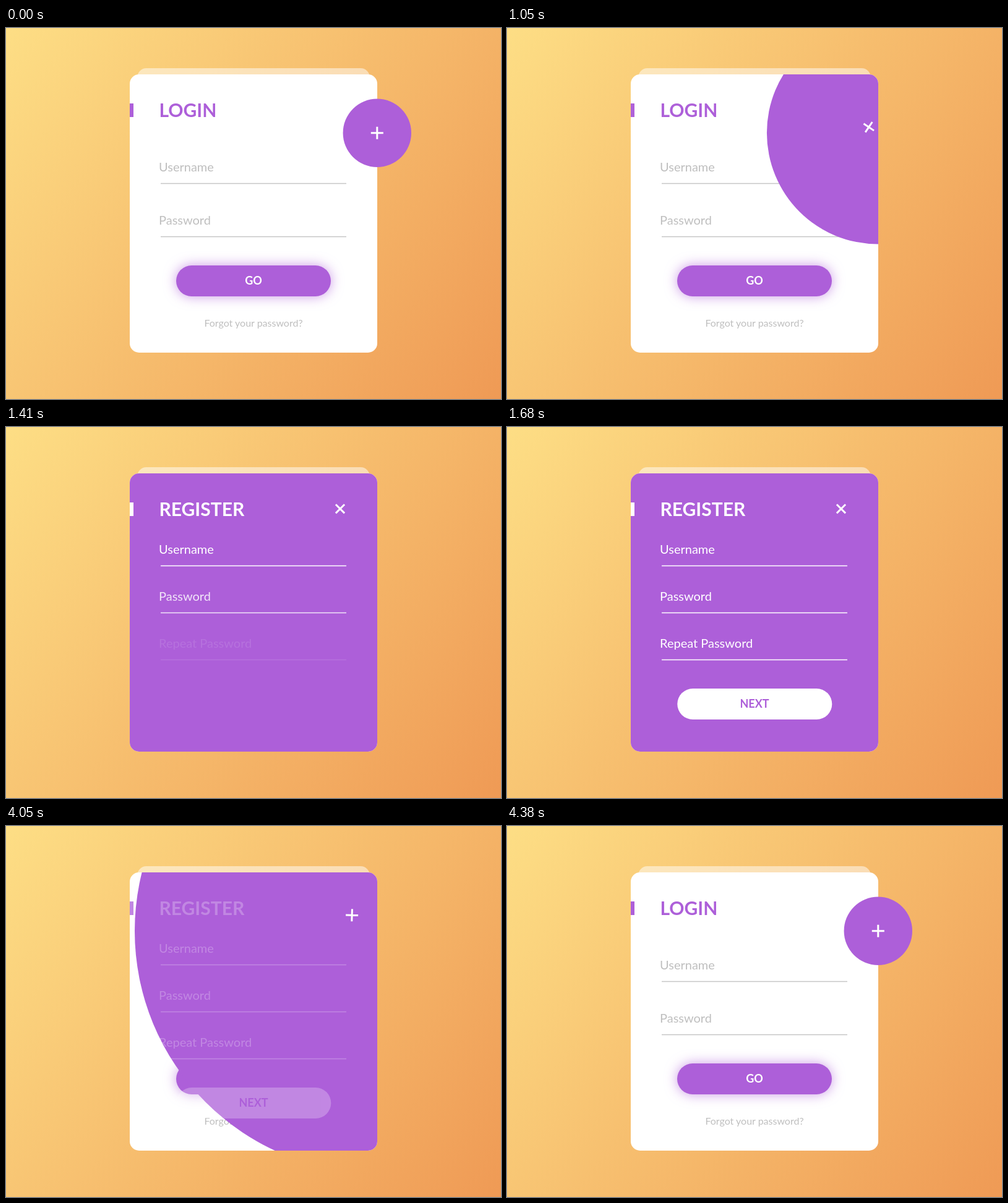
These frames come from a looping animation (800x600 px, 4500 ms). An HTML page:

```html
<!DOCTYPE html>
<html lang="en">
<head>
<meta charset="utf-8">
<title>Login and register card</title>
<style>
  html, body { margin: 0; width: 100%; height: 100%; overflow: hidden; }
  svg { display: block; width: 100vw; height: 100vh; font-family: Lato, sans-serif; }
  .accent { fill: #ad5fd9; }
  .title { font-size: 30px; font-weight: 700; }
  .label { font-size: 20px; }
  .action { font-size: 18px; font-weight: 700; text-anchor: middle; }
  .hint { font-size: 16px; text-anchor: middle; }
  .muted { fill: #bfbfbf; stroke: none; }
  .light { fill: #fff; }
  .rule { stroke-width: 1.5; }
  .muted .rule { stroke: #c6c6c6; }
  .light .rule { stroke: #fff; }
  .glow { filter: drop-shadow(0 0 10px rgba(173, 95, 217, .65)); }
</style>
</head>
<body>
<svg viewBox="0 0 800 600" preserveAspectRatio="none">
  <defs>
    <linearGradient id="sky" gradientUnits="userSpaceOnUse" x1="0" y1="0" x2="800" y2="600">
      <stop offset="0" stop-color="#fdde85"/>
      <stop offset="1" stop-color="#ef9a55"/>
    </linearGradient>
    <clipPath id="cardClip"><rect x="200" y="75" width="400" height="450" rx="15"/></clipPath>
  </defs>

  <rect width="800" height="600" fill="url(#sky)"/>
  <path d="M212 75V80a15 15 0 0 1 15-15H573a15 15 0 0 1 15 15V75Z" fill="none"/>
  <g clip-path="inset(0)">
    <svg x="200" y="65" width="400" height="10" viewBox="200 65 400 10">
      <rect x="212" y="65" width="376" height="60" rx="15" fill="#fff" opacity=".5"/>
    </svg>
  </g>
  <rect x="200" y="75" width="400" height="450" rx="15" fill="#fff"/>

  <g class="accent">
    <rect x="200" y="122" width="6" height="22"/>
    <text class="title" x="247.5" y="143.5">LOGIN</text>
    <rect class="glow" x="275" y="384" width="250" height="50" rx="25"/>
  </g>
  <text class="action light" x="400" y="415.3">GO</text>
  <g class="muted" id="loginFields"></g>
  <text class="hint muted" x="400" y="483">Forgot your password?</text>

  <g id="discClip"><circle id="disc" class="accent" cx="599.8" cy="169.7"/></g>

  <g class="light">
    <g class="part">
      <rect x="200" y="122" width="6" height="22"/>
      <text class="title" x="247.5" y="143.5">REGISTER</text>
    </g>
    <g id="registerFields"></g>
    <g class="part">
      <rect x="275.3" y="423" width="250" height="50" rx="25"/>
      <text class="action accent" x="400" y="454.4">NEXT</text>
    </g>
  </g>
  <path id="plus" d="M-10 0H10M0 -10V10" stroke="#fff" stroke-width="3"/>
</svg>

<script>
const LOOP = 4500, STEP = 30;
const MOVE = 460, OPEN = 896, CLOSE = 3874;
const HOLD_END = 3930, UNCLIP = 4380;
const FADE = 210, FADE_START = 1035, STAGGER = 110, FADE_OUT = 180;

const byId = id => document.getElementById(id);
const mix = (a, b, p) => a + (b - a) * p;

// Sine ease in and out between two moments, clamped at both ends.
function ease(time, start, duration) {
  const p = Math.min(1, Math.max(0, (time - start) / duration));
  return (1 - Math.cos(Math.PI * p)) / 2;
}

function field(label, baseline, lineY) {
  return `<g class="part"><text class="label" x="247" y="${baseline}">${label}</text>` +
    `<path class="rule" d="M250 ${lineY}H550"/></g>`;
}

byId('loginFields').innerHTML =
  field('Username', 232, 251.5) + field('Password', 318, 337.5);
byId('registerFields').innerHTML = ['Username', 'Password', 'Repeat Password']
  .map((label, i) => field(label, 205 + 76 * i, 224.5 + 76 * i)).join('');

const disc = byId('disc'), discClip = byId('discClip'), plus = byId('plus');
const parts = document.querySelectorAll('.light .part');

function draw(time) {
  const closing = time >= HOLD_END;
  const open = closing ? 1 - ease(time, CLOSE, MOVE) : ease(time, OPEN, MOVE);

  disc.setAttribute('r', mix(55.2, 550, open));
  if (time > OPEN + STEP / 2 && time < UNCLIP) discClip.setAttribute('clip-path', 'url(#cardClip)');
  else discClip.removeAttribute('clip-path');

  const x = mix(599.8, 540, open), y = mix(169.7, 132.3, open);
  plus.setAttribute('transform', `translate(${x} ${y}) rotate(${135 * open})`);

  parts.forEach((part, i) => {
    part.style.opacity = closing
      ? 1 - ease(time, HOLD_END, FADE_OUT)
      : ease(time, FADE_START + i * STAGGER, FADE);
  });
}

const begin = performance.now();
function frame() {
  const time = (performance.now() - begin) % LOOP;
  draw(Math.floor(time / STEP) * STEP);
  requestAnimationFrame(frame);
}
draw(0);
requestAnimationFrame(frame);
</script>
</body>
</html>
```
